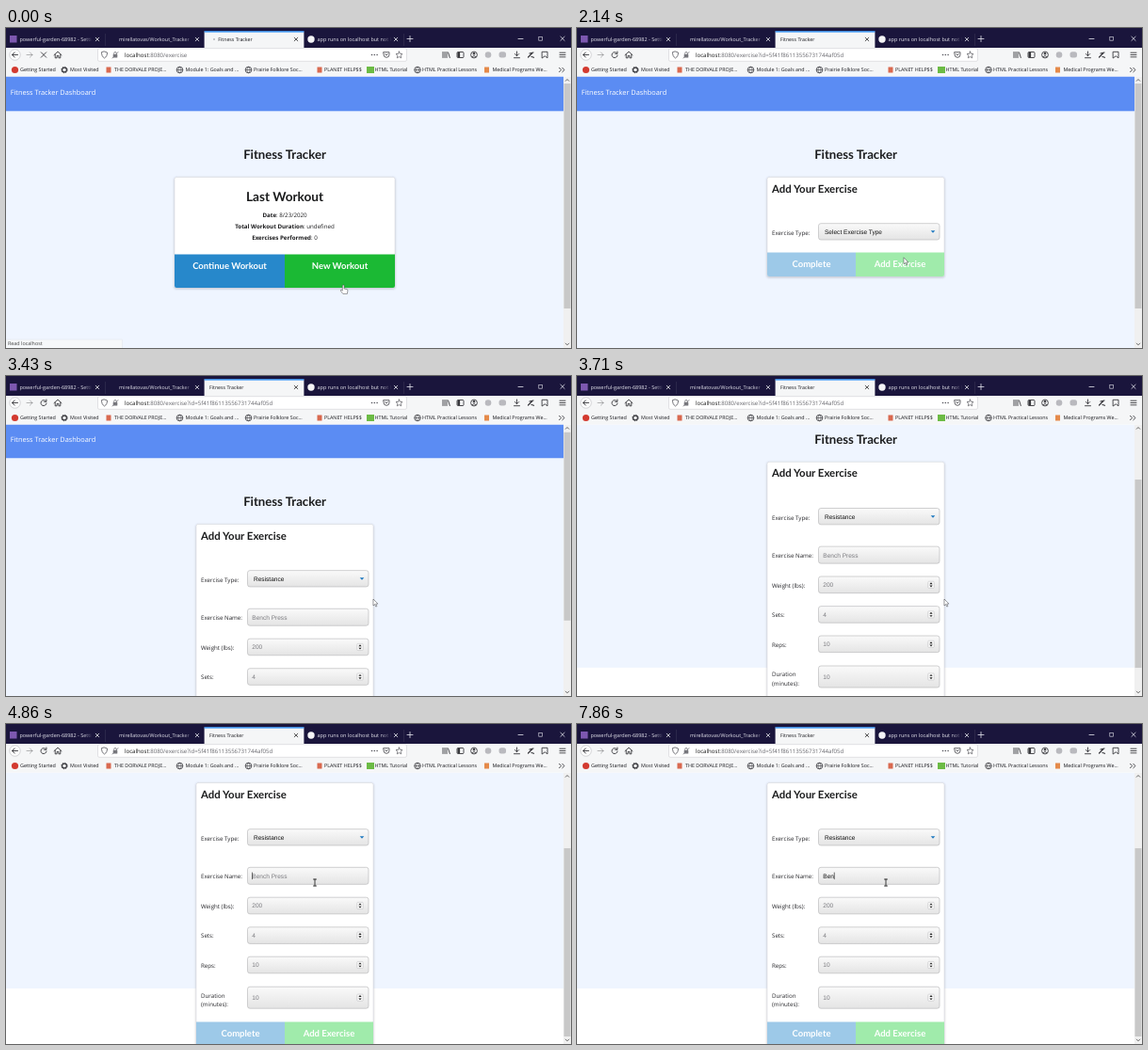
Write an HTML page that moves like this. It is 600 by 340 pixels and loops after 8000 ms.

```html
<!DOCTYPE html>
<html lang="en">
<head>
<meta charset="utf-8">
<title>Fitness Tracker</title>
<style>
  html, body { margin: 0; width: 100%; height: 100%; overflow: hidden; background: #fff; }
  #stage { display: block; width: 100vw; height: 100vh; }
  text { font-family: 'Open Sans', 'Noto Sans', sans-serif; white-space: pre; text-rendering: geometricPrecision; }
  .head { font-family: Lato, sans-serif; font-weight: 700; }
  .field { font-family: 'Liberation Sans', Arial, sans-serif; font-size: 6.55px; }
  .line { fill: none; stroke: #38383d; stroke-width: .9; stroke-linecap: round; stroke-linejoin: round; }
</style>
</head>
<body>
<svg id="stage" viewBox="0 0 600 340"></svg>
<script>
const DURATION = 8000;
const STEP = 1000 / 7;
const BAR = '#1a153c';
const stage = document.getElementById('stage');

const rect = (x, y, w, h, fill, more = '') =>
  `<rect x="${x}" y="${y}" width="${w}" height="${h}" fill="${fill}" ${more}/>`;
const dot = (x, y, r, fill, more = '') =>
  `<circle cx="${x}" cy="${y}" r="${r}" fill="${fill}" ${more}/>`;
const text = (x, y, size, str, fill = '#222', more = '') =>
  `<text x="${x}" y="${y}" font-size="${size}" fill="${fill}" ${more}>${str}</text>`;
const line = (d, more = '') => `<path class="line" d="${d}" ${more}/>`;
const shape = (d, fill, more = '') => `<path d="${d}" fill="${fill}" ${more}/>`;
const head = (x, y, size, str, fill = '#1b1c1d', anchor = 'middle') =>
  text(x, y, size, str, fill, `class="head" text-anchor="${anchor}"`);
const group = (id, body) => `<g id="${id}">${body}</g>`;

const defs = `<defs>
  <linearGradient id="fieldFill" x2="0" y2="1">
    <stop stop-color="#fafafa"/><stop offset="1" stop-color="#e4e4e4"/>
  </linearGradient>
  <linearGradient id="fade">
    <stop stop-color="${BAR}" stop-opacity="0"/><stop offset="1" stop-color="${BAR}"/>
  </linearGradient>
  <filter id="shadow" x="-5%" y="-5%" width="110%" height="112%">
    <feDropShadow dx="0" dy=".8" stdDeviation=".9" flood-color="#445" flood-opacity=".36"/>
  </filter>
</defs>`;

// Browser window
const closeMark = (x, y, r, color) =>
  line(`M${x - r} ${y - r}l${2 * r} ${2 * r}m0 ${-2 * r}l${-2 * r} ${2 * r}`, `style="stroke:${color};stroke-width:.8"`);

function tabBar() {
  const pale = '#e4e4ec';
  return rect(0, 0, 600, 21, BAR)
    + rect(4, 8, 7.5, 7.5, '#7d58b0')
    + text(14.5, 13.8, 5.5, 'powerful-garden-68982 - Setti', pale)
    + rect(82, 5, 11, 14, 'url(#fade)')
    + text(120, 13.8, 5.4, 'mirellatovas/Workout_Tracker', pale)
    + rect(188, 5, 11, 14, 'url(#fade)')
    + rect(199, 5, 12, 14, BAR)
    + dot(324, 12, 3.7, '#f4f4f6')
    + text(330.5, 13.8, 5.5, 'app runs on localhost but not lo', pale)
    + rect(398, 5, 12, 14, 'url(#fade)') + rect(410, 5, 12, 14, BAR)
    + rect(105.3, 6, .5, 13, '#3d3a58') + rect(422, 6, .5, 13, '#3d3a58')
    + rect(210.6, 3.4, 105.8, 17.6, '#f5f6f7') + rect(210.6, 3.4, 105.8, 1.1, '#0a84ff')
    + text(216, 13.8, 5.25, 'Fitness Tracker', '#15151a', 'id="tabTitle"')
    + dot(221, 12, .8, '#8a8a92', 'id="loadDot"')
    + [97, 203, 414].map(x => closeMark(x, 12, 1.8, pale)).join('')
    + closeMark(308, 12, 1.8, '#333')
    + line('M426 11.5h6m-3 -3v6M544 11.5h5', `style="stroke:${pale};stroke-width:.8"`)
    + rect(565.8, 9.4, 3.8, 3.8, 'none', `stroke="${pale}" stroke-width=".6"`)
    + closeMark(591, 11.3, 2.1, pale);
}

function toolbar() {
  return rect(0, 21, 600, 30.5, '#f5f6f7')
    + dot(9.5, 28.5, 5.7, '#fff', 'stroke="#b8b8bc" stroke-width=".6"')
    + line('M12.5 28.5h-6m2.6 -2.6l-2.6 2.6l2.6 2.6')
    + line('M22 28.5h6m-2.6 -2.6l2.6 2.6l-2.6 2.6', 'opacity=".4"')
    + group('stop', line('M37.3 25.8l5.4 5.4m0 -5.4l-5.4 5.4'))
    + group('reload', line('M42.4 26.8a3 3 0 1 0 .6 2.2M42.9 25v2.3h-2.3'))
    + line('M51 28.7l4 -3.6l4 3.6M52.2 28.2v3.6h1.9v-2.3h1.8v2.3h1.9v-3.6')
    + rect(97.5, 21.7, 328, 13.6, '#fff', 'rx="1.5" stroke="#cfcfd3" stroke-width=".6"')
    + line('M104.5 25l3 1c0 3 -1 4.8 -3 6c-2 -1.2 -3 -3 -3 -6z', 'style="stroke:#66666c"')
    + rect(113.7, 28, 4.6, 3.6, '#77777d', 'rx=".5"')
    + line('M114.7 28v-1.2a1.3 1.3 0 0 1 2.6 0v1.2M113 32l6 -6.5', 'style="stroke:#77777d;stroke-width:.8"')
    + `<text x="126" y="30.6" font-size="6.1" fill="#65656b"><tspan fill="#111">localhost</tspan>:8080/exercise<tspan id="query">?id=5f41f86113556731744af05d</tspan></text>`
    + [388.5, 391.3, 394.1].map(x => dot(x, 28.5, .8, '#55555b')).join('')
    + line('M401 25.7h6v2.6a3 3 0 0 1 -6 0zM402.6 27.7l1.4 1.3l1.4 -1.3', 'style="stroke:#55555b"')
    + line('M417.5 25l1 2.3l2.5 .3l-1.8 1.7l.5 2.5l-2.2 -1.2l-2.2 1.2l.5 -2.5l-1.8 -1.7l2.5 -.3z', 'style="stroke:#55555b;stroke-width:.7"')
    + line('M464 25.5v6M466 25.5v6M468 25.5v6M469.6 26l1.7 5.5')
    + rect(479, 25.5, 7, 6, 'none', 'rx="1" stroke="#38383d" stroke-width=".9"') + rect(479.5, 26, 2.6, 5, '#38383d')
    + dot(497, 28.5, 3.4, 'none', 'stroke="#38383d" stroke-width=".9"') + dot(497, 27.3, 1.2, '#38383d')
    + line('M495 30.7c.8 -1.5 3.2 -1.5 4 0')
    + dot(512, 28.5, 3.3, '#b9b9be') + rect(523.5, 25.3, 7.5, 6.2, '#b9b9be', 'rx="2.5"')
    + line('M542.5 25v4.5m-2.2 -2l2.2 2.2l2.2 -2.2M539.5 31.7h6')
    + line('M554.5 31l4.5 -4.5M556 27l4 -1M558 30.5l2.5 .8', 'style="stroke-width:1.2"')
    + line('M569.5 25.3h5.5v6.5l-2.7 -2l-2.8 2z')
    + line('M588 26.2h6M588 28.5h6M588 30.8h6');
}

function bookmarks() {
  const items = [
    [15, 'Getting Started'], [68, 'Most Visited'], [115, 'THE DORVALE PROJE...'],
    [190.5, 'Module 1: Goals and ...'], [263, 'Prairie Folklore Soc...'], [338, 'PLANET HELP$$'],
    [391.5, 'HTML Tutorial'], [442, 'HTML Practical Lessons'], [516.5, 'Medical Programs We...']
  ];
  const globe = x => dot(x, 44.5, 3.3, 'none', 'stroke="#38383d" stroke-width=".8"')
    + line(`M${x - 3} 44.5h6M${x} 41.3c-2 2 -2 4.4 0 6.4c2 -2 2 -4.4 0 -6.4`, 'style="stroke-width:.6"');
  return items.map(([x, label]) => text(x, 46.4, 5.35, label, '#15151a')).join('')
    + dot(9.5, 44.5, 3.6, '#d33a30')
    + dot(62, 44.5, 2.4, 'none', 'stroke="#38383d" stroke-width="1.2"')
    + dot(62, 44.5, 3.2, 'none', 'stroke="#38383d" stroke-width="1" stroke-dasharray="1.2 1.3"')
    + [184.5, 257.5, 437].map(globe).join('')
    + rect(106.5, 41.5, 5, 6, '#d9694f') + rect(330.5, 41.5, 5, 6, '#d9694f')
    + rect(383, 41, 8, 7, '#6cbb45') + rect(508, 41.5, 5, 6, '#e58a4a')
    + line('M587.5 42.3l2.2 2.2l-2.2 2.2M590.8 42.3l2.2 2.2l-2.2 2.2');
}

// Page
const card = (x, y, w, h) =>
  rect(x, y, w, h, '#fff', 'rx="2" filter="url(#shadow)" stroke="#d0d3d8" stroke-width=".5"');

function buttons(x, y, w, h, base, left, right, blue, green) {
  const r = 2, mid = 296, end = x + w;
  return shape(`M${x} ${y}H${mid}V${y + h}H${x + r}q${-r} 0 ${-r} ${-r}z`, blue)
    + shape(`M${mid} ${y}H${end}V${y + h - r}q0 ${r} ${-r} ${r}H${mid}z`, green)
    + head((x + mid) / 2, base, 9.5, left, '#fff') + head((mid + end) / 2, base, 9.5, right, '#fff');
}

const pair = (y, key, value) =>
  text(296, y, 6.2, `<tspan font-weight="700">${key}</tspan>: ${value}`, '#1c1c1e', 'text-anchor="middle"');

const lastWorkout = () => card(179, 158.5, 234, 117.5)
  + head(296, 183.8, 13.6, 'Last Workout')
  + pair(201.2, 'Date', '8/23/2020')
  + pair(213, 'Total Workout Duration', 'undefined')
  + pair(224.7, 'Exercises Performed', '0')
  + buttons(179, 240.5, 234, 35.5, 256.2, 'Continue Workout', 'New Workout', '#2788cb', '#1bb934');

const label = (y, str) => text(207, y, 6.2, str, '#26262a');
const box = (y, h) => rect(256.5, y, 128.5, h, 'url(#fieldFill)', 'rx="2.5" stroke="#bcbcbe" stroke-width=".7"');
const hint = (y, str, id = '') => text(261.3, y, 6.55, str, '#7c7c80', `class="field" ${id}`);

function spinner(y) {
  return rect(372.7, y - 3.6, 6.6, 7.2, '#f6f6f6', 'rx="1" stroke="#b4b4b6" stroke-width=".4"')
    + shape(`M374.4 ${y - .7}h3.2l-1.6 -1.9zM374.4 ${y + .7}h3.2l-1.6 1.9z`, '#222');
}

const numberField = (y, h, name, value) =>
  box(y, h) + hint(y + h / 2 + 2.1, value) + spinner(y + h / 2) + (name ? label(y + h / 2 + 2.8, name) : '');

const faded = (y) => buttons(202, y, 188, 25.5, y + 15.6, 'Complete', 'Add Exercise', '#9dc9e8', '#a0ebab');

const typeField = () => head(207, 174.6, 11.4, 'Add Your Exercise', '#1b1c1d', 'start')
  + label(219.9, 'Exercise Type:') + box(207.7, 17.3)
  + text(263, 218.7, 6.55, '', '#111', 'class="field" id="type"')
  + shape('M375.7 215.3h4.6l-2.3 2.5z', '#1c78c0');

const shortCard = () => card(202, 158.5, 188, 105.5) + faded(238.5);
const longCard = () => card(202, 158.5, 188, 279.5)
  + label(260.2, 'Exercise Name:') + box(248.3, 18)
  + hint(259.7, 'Bench Press', 'id="name"')
  + rect(0, 253.6, .6, 7.5, '#111', 'id="caret"')
  + numberField(280.2, 17.6, 'Weight (lbs):', '200')
  + numberField(311.8, 17.6, 'Sets:', '4')
  + numberField(343.2, 17.6, 'Reps:', '10')
  + numberField(375.2, 23, '', '10')
  + label(386.6, 'Duration') + label(395.9, '(minutes):')
  + faded(412.5);

const page = () => `<svg x="0" y="51.5" width="592" height="288.5" viewBox="0 51.5 592 288.5">`
  + group('page',
    rect(0, 51, 592, 326, '#eff5ff') + rect(0, 51, 592, 37.3, '#5b8cf3')
    + text(4.7, 71.2, 7.35, 'Fitness Tracker Dashboard', '#fff')
    + head(296, 139, 13.2, 'Fitness Tracker')
    + group('last', lastWorkout()) + group('short', shortCard())
    + group('long', longCard()) + group('typeRow', typeField()))
  + `</svg>`;

const scrollbar = () => rect(592, 51.5, 8, 288.5, '#f0f0f0')
  + shape('M594 56.5l2 -2l2 2M594 334.8l2 2l2 -2', 'none', 'stroke="#555" stroke-width=".9"')
  + rect(592.5, 59, 7, 200, '#c8c8c8', 'id="thumb"');

const status = () => group('status',
  rect(-1, 331, 124.5, 10, '#f6f8fa', 'stroke="#dfe4ea" stroke-width=".5"')
  + text(2, 337.4, 5.4, 'Read localhost', '#444'));

const outline = 'stroke="#3a3a3e" stroke-width=".5" stroke-linejoin="round"';
const pointers = () =>
  group('hand', shape('M-1 .5q1 -1 1.8 0v3.5l3 .6q1 .4 .8 1.5l-.5 3.3h-4.6l-2.5 -3.2q0 -1.2 1 -.8l1 .8z', '#fff', outline))
  + group('arrow', shape('M0 0v7l1.6 -1.4l1.2 2.5l1.1 -.5l-1.2 -2.5h2.2z', '#fff', outline))
  + group('beam', line('M-1.5 -3.5h3M0 -3.5v7M-1.5 3.5h3', 'style="stroke:#111;stroke-width:.8"'));

stage.innerHTML = defs + page() + scrollbar() + status() + tabBar() + toolbar() + bookmarks() + pointers();

const el = {};
stage.querySelectorAll('[id]').forEach(node => { el[node.id] = node; });

// Timeline
const LOADED = 290, CHOSEN = 2290, FOCUSED = 4640;
const KEYS = [7290, 7570, 7710];
const PATH = [
  [0, 358.3, 273], [290, 358.3, 273], [820, 334, 214.7], [1450, 334, 214.7],
  [2050, 347, 243.8], [2430, 347, 243.8], [3150, 390, 237], [4000, 390, 237],
  [4520, 328, 168.5], [DURATION, 328, 168.5]
];

const smooth = p => { p = Math.min(1, Math.max(0, p)); return p * p * (3 - 2 * p); };
const show = (node, on) => node.setAttribute('display', on ? 'inline' : 'none');

function pointerAt(t) {
  const i = PATH.findIndex((p, k) => k > 0 && t <= p[0]);
  const [t0, x0, y0] = PATH[i - 1], [t1, x1, y1] = PATH[i];
  const p = smooth((t - t0) / (t1 - t0));
  return [x0 + (x1 - x0) * p, y0 + (y1 - y0) * p];
}

function render(t) {
  const loading = t < LOADED, chosen = t >= CHOSEN;
  const scroll = 96 * smooth((t - 3400) / 487);

  show(el.last, loading);
  show(el.typeRow, !loading);
  show(el.short, !loading && !chosen);
  show(el.long, chosen);
  show(el.status, loading);
  show(el.stop, loading);
  show(el.reload, !loading);
  show(el.loadDot, loading);
  show(el.query, !loading);
  el.reload.setAttribute('opacity', t < 1290 ? .75 : 1);
  el.tabTitle.setAttribute('x', loading ? 225.3 : 216);
  el.loadDot.setAttribute('cx', 221 + 2 * Math.sin(t / 150));
  el.type.textContent = chosen ? 'Resistance' : 'Select Exercise Type';

  el.page.setAttribute('transform', `translate(0 ${-scroll.toFixed(2)})`);
  el.thumb.setAttribute('y', 59 + scroll * .76);
  el.thumb.setAttribute('height', chosen ? 200 : 239);

  const typed = KEYS.filter(k => t >= k).length;
  el.name.textContent = typed ? 'Ben'.slice(0, typed) : 'Bench Press';
  el.name.setAttribute('fill', typed ? '#111' : '#7c7c80');
  show(el.caret, typed > 0 || (t >= FOCUSED && (t - FOCUSED) % 1000 < 500));
  el.caret.setAttribute('x', 261.2 + (typed ? el.name.getComputedTextLength() : 0));

  const [x, y] = pointerAt(t);
  const overName = t > 4000 && x < 385 && y < 267 - scroll;
  const kind = loading ? 'hand' : overName ? 'beam' : 'arrow';
  for (const id of ['hand', 'arrow', 'beam']) show(el[id], id === kind);
  el[kind].setAttribute('transform', `translate(${x.toFixed(2)} ${y.toFixed(2)})`);
}

function tick() {
  const t = performance.now() % DURATION;
  const step = Math.floor((t + 5) / STEP) % 56;
  render(Math.round(step * STEP / 10) * 10);
  requestAnimationFrame(tick);
}
tick();
</script>
</body>
</html>
```
